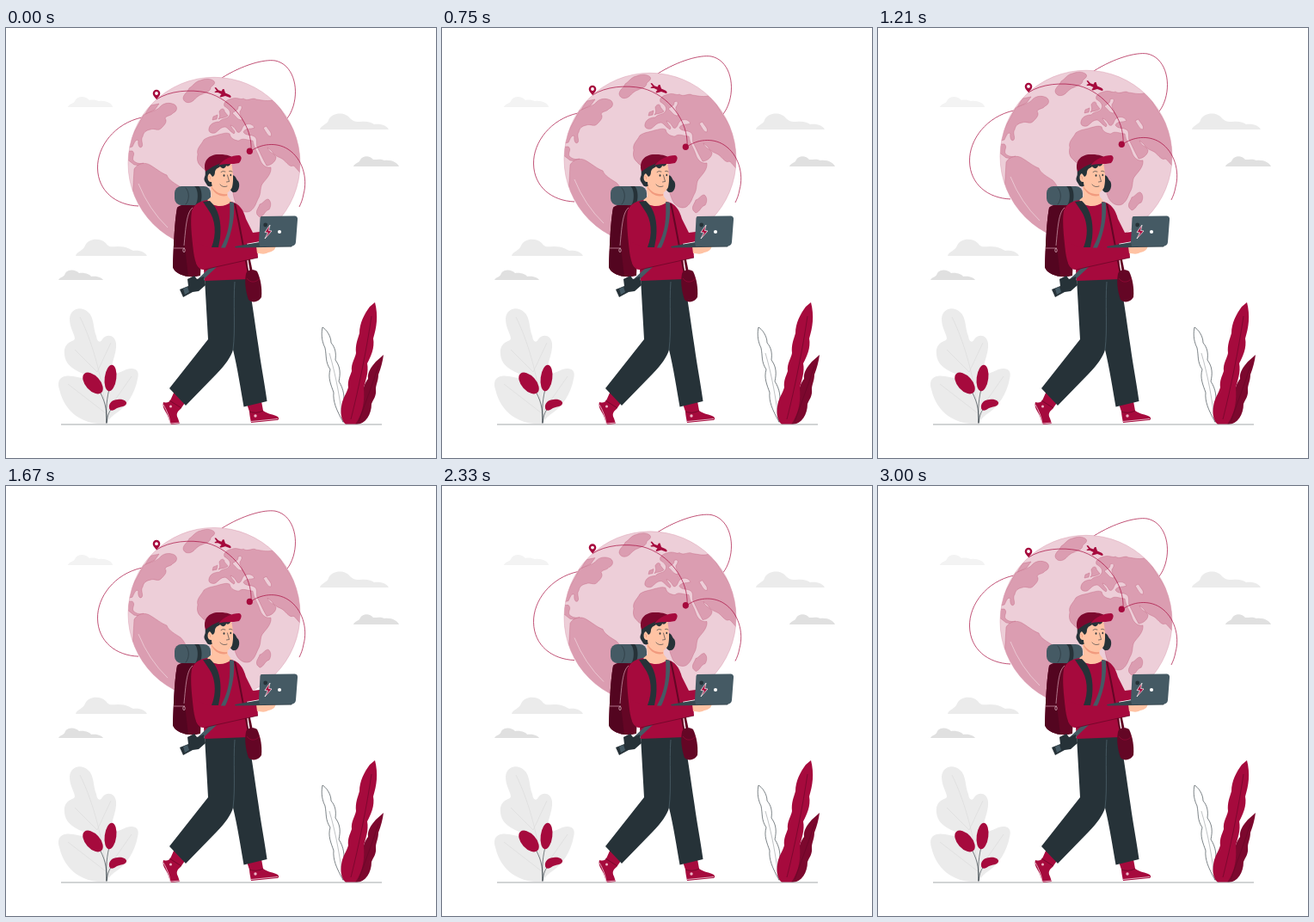
Recreate the animation shown at these times as an HTML page. Size 500 by 500 pixels, loop 3.04 s.

```html
<!DOCTYPE html>
<html lang="en">
<head>
<meta charset="utf-8">
<title>Traveller</title>
<style>
  html, body { margin: 0; width: 100%; height: 100%; overflow: hidden; background: #fff }
  svg { display: block; width: 100vw; height: 100vh }
  .red { fill: #a60a3d }
  .wine { fill: #640625 }
  .dark { fill: #263238 }
  .slate { fill: #455a64 }
  .skin { fill: #ffc3a4 }
  .pale { fill: #ebebeb }
  .grey { fill: #e0e0e0 }
  .line { fill: none; stroke: #263238; stroke-width: .6; stroke-linecap: round }
  .route { fill: none; stroke: #a60a3d; stroke-width: .7 }
  .land path { fill: #db9db1; stroke: #c0637f; stroke-width: .4 }
</style>
</head>
<body>
<svg viewBox="0 0 500 500">
  <defs><clipPath id="disc"><circle cx="242" cy="157.3" r="100"/></clipPath></defs>

  <g id="clouds">
    <path fill="#f3f3f3" d="M72 92C73 88 79 88 80 85C83 78 93 79 97 84C101 83 105 84 108 85C116 84 124 88 124 92Z"/>
    <path class="pale" d="M365 118C366 113 374 112 375 107C380 97 395 98 400 105C404 109 407 109 412 109C420 108 425 110 428 112C437 111 443 114 445 118Z"/>
    <path class="grey" d="M404 161C405 157 411 157 412 153C416 147 424 149 427 153C432 153 436 152 440 154C449 153 455 157 457 161Z"/>
    <path class="pale" d="M81 265C82 260 90 259 92 253C96 244 110 244 116 250C120 256 124 254 130 254C140 254 144 257 148 259C156 258 162 261 164 265Z"/>
    <path class="grey" d="M61 293C63 289 68 290 69 285C73 280 81 281 85 285C92 284 98 287 99 289C105 288 111 290 113 293Z"/>
  </g>

  <g id="globe">
    <path class="route" d="M251 58C275 43 300 36 313 38C333 42 341 68 334 91C332 97 330 101 327 105M158 104C126 111 106 138 106.500 163C107 190 128 206 154 207"/>
    <circle cx="242" cy="157.3" r="100" fill="#edced8" stroke="#db9db1" stroke-width=".5"/>
    <g class="land" clip-path="url(#disc)">
      <path d="M160 101C167 97 173 97 178 93C182 87 190 86 196 89C200 92 199 97 194 99C191 103 187 101 185 105C188 109 184 113 181 116C177 121 173 116 168 118C163 119 160 121 159 126C156 130 160 135 158 138C155 141 153 135 154 131C151 128 149 134 147 138L139 140Z"/>
      <path d="M168 90L178 88L173 95L162 100Z"/>
      <path d="M138 143L147 143C151 147 146 150 148 154C152 158 156 158 160 157L158 160L149 159L140 152Z"/>
      <path d="M149 164C153 157 162 156 167 159C174 163 181 169 187 171C189 177 197 181 203 185C211 193 215 206 205 222L198 250L160 235L147 200Z"/>
      <path d="M206 82C206 77 211 75 213 70C218 67 220 62 226 61C231 59 238 58 242 62C244 65 240 67 238 69C238 74 232 75 228 77C222 79 220 83 217 85C213 88 207 87 206 82Z"/>
      <path d="M248 97C250 93 254 93 254 97L258 102C255 105 250 104 247 106C250 102 248 100 248 97ZM241 103L246 101L245 106L240 107Z"/>
      <path d="M236 117C237 111 243 109 248 109C251 105 256 106 259 103C263 98 259 94 254 91C252 86 258 83 263 82C269 80 273 84 276 82C281 86 287 80 291 83C299 84 305 86 312 83L342 130L345 170C341 169 338 162 334 160C329 163 325 153 319 151C314 149 311 147 309 143L304 139C306 145 312 146 314 150C314 156 307 160 303 160C299 153 296 146 293 140C290 137 293 131 290 127C285 123 279 126 276 121C278 116 284 118 289 116C286 110 279 111 276 114C274 117 273 123 269 121C266 116 264 114 261 113C263 118 268 120 265 123C260 120 258 116 255 115C249 115 247 120 243 122C239 123 235 121 236 117Z"/>
      <path d="M223 147C221 140 227 136 230 130C235 126 242 126 247 124C252 123 256 121 260 123C261 129 267 131 271 131C275 127 282 131 287 131C288 139 293 145 295 152C297 158 301 163 308 162C309 169 303 175 299 180C295 184 297 191 294 197C291 202 290 209 284 213C278 216 270 212 267 203C263 194 264 183 260 178C255 172 257 164 249 164C241 168 232 168 227 161C222 157 222 152 223 147Z"/>
      <path d="M292 217C290 212 294 209 295 205C299 204 301 199 305 199C309 202 308 208 306 211C301 212 300 219 295 220Z"/>
      <path style="fill:#edced8" d="M263 99C267 102 269 107 274 107C276 104 271 101 272 97C276 92 274 89 270 91C270 96 267 96 263 99ZM299 116C302 120 304 126 308 126C310 121 304 118 303 114Z"/>
    </g>
    <path d="M154 181Q166 211 188 232" fill="none" stroke="#f5e2e8" stroke-width=".6"/>
    <path class="route" d="M175 83C190 73 214 71 233 75C264 83 287 114 285 143C296 135 314 132 328 141C345 152 351 175 346 193C345 199 343 204 341 208"/>
    <ellipse class="red" cx="283.3" cy="143.3" rx="3.6" ry="3.8"/>
    <path class="red" fill-rule="evenodd" d="M175 83C172 79.500 170.700 78 170.700 76A4.300 4.300 0 0 1 179.300 76C179.300 78 178 79.500 175 83ZM175 74.100A1.900 1.900 0 0 0 175 77.900A1.900 1.900 0 0 0 175 74.100Z"/>
    <path class="red" d="M242.500 69.500L244 69L247 72.200L250.500 73.500L252 71L253.500 71L255 75.500L259.500 77.500C262 79 262.500 80.500 260.500 81L255 79L249.500 80.500L248.500 79.500L250.500 77L246.500 75L243 75L242.500 74L245 73Z"/>
  </g>

  <g id="plants">
    <path class="pale" d="M117 460C100 462 70 455 62 420C58 406 68 403 78 405C88 407 93 409 96 405C88 400 70 397 68 380C67 370 71 366 79 363C83 360 74 351 74 338C75 326 87 323 95 330C103 336 101 350 105 358C106 366 110 366 112 362C117 355 127 357 128 367C129 380 121 390 123 402C128 403 133 400 140 397C150 394 156 398 153 408C150 425 140 440 128 448C122 452 118 457 117 460Z"/>
    <path fill="none" stroke="#dcdcdc" stroke-width=".7" d="M117 460C115 420 103 370 86 336M80 374L106 400L122 366M72 414L116 448L146 405M113 420L98 407"/>
    <path class="line" d="M117 459C118 443 114 431 108 421M117 459C116 443 117 430 121 416M117 459C118 450 120 444 126 440"/>
    <ellipse class="red" cx="101" cy="413" rx="8.500" ry="14.800" transform="rotate(-42 101 413)"/>
    <ellipse class="red" cx="121.500" cy="407" rx="6.800" ry="15.300" transform="rotate(7 121.500 407)"/>
    <path class="red" d="M120 442C119 436 124 432 130 432C136 431 141 434 140 437C138 441 133 440 129 442C125 445 121 446 120 442Z"/>
    <path class="line" d="M392 458C384 444 380 434 381 424C378 415 374 407 377 397C371 388 373 382 371 372C366 362 367 353 368 348C372 350 378 358 378 366C383 372 384 378 383 386C389 394 389 402 387 411C393 420 394 430 392 438C393 445 393 452 392 458"/>
    <path stroke="#263238" stroke-width=".3" fill="none" d="M391 455C389 435 384 405 376 378"/>
    <path fill="#7c082e" d="M439 380C438 388 436 395 433 403C433 410 430 415 430 420C431 428 427 432 425 437C425 450 418 460 408 461L403 461C406 445 412 435 416 428C414 418 418 412 421 408C420 400 425 394 430 388Z"/>
    <path class="red" d="M429 319C433 335 431 348 427 361C429 372 424 382 420 390C422 400 418 410 416 418C417 432 416 447 406 461L395 461C389 455 389 447 390 440C391 431 396 425 398 418C397 410 400 405 402 399C401 390 406 384 407 378C406 368 409 362 411 355C411 343 417 332 423 324Z"/>
    <path fill="none" stroke="#640625" stroke-width=".6" d="M425 335C420 370 410 420 401 455M433 393C426 415 417 438 410 458"/>
  </g>
  <path d="M64 461H437" stroke="#a4a8aa" stroke-width="1"/>

  <g id="shoes">
    <path class="red" d="M196 422L210 433L203 443C198 447 198 450 200 454L202 460L192 461C190 459 190 455 188 451C186 446 181 441 183 435C187 436 190 436 192 431Z"/>
    <path class="red" d="M280 437L297 434L299 445C304 449 311 449 316 452C318 454 317 456 315 456L285 459C284 454 283 449 283 446Z"/>
    <path d="M183 438C187 445 190 452 191 460L202 459M285 457.500L316 454.500" fill="none" stroke="#f2d5de" stroke-width=".8"/>
    <path d="M190 433L204 442M283 446Q291 449 299 445" fill="none" stroke="#640625" stroke-width=".7"/>
    <circle cx="290" cy="451" r="1.700" fill="#edb5c6"/><circle cx="191.500" cy="440" r="1.500" fill="#edb5c6"/>
  </g>

  <g id="pack">
    <path class="wine" d="M199 209C203 204 218 204 232 207L228 250L226 288C212 292 196 286 194 278C195 250 196 225 199 209Z"/>
    <path fill="#530520" d="M199 209C203 205 210 205 217 207C210 214 209 232 208 255L212 289C203 288 195 283 194 278C195 250 196 225 199 209Z"/>
    <path fill="none" stroke="#d9a5b6" stroke-width=".7" d="M217 209C210 214 209 232 207 253M194.500 256H208"/>
    <ellipse cx="207" cy="258.500" rx="1.200" ry="2.200" fill="none" stroke="#e5c0cc" stroke-width=".7"/>
    <rect class="slate" x="196" y="184" width="42" height="22" rx="8"/>
    <path class="line" d="M209 186C214 191 213 201 209 205"/>
    <path d="M219 184C224 187 224 202 220 206H225C229 200 228 187 224 184Z" class="dark"/>
  </g>

  <path class="dark" d="M231 291L281 290C285 310 289 340 293.500 370C297 395 301 415 303.500 434L276.500 440.500C273 420 269 395 264 374C262 382 254 393 245 402L209 439L190 419L235 362Z"/>
  <path d="M266 295C264 320 267 350 264 374" fill="none" stroke="#526871" stroke-width=".7"/>

  <g id="body">
    <path class="skin" d="M237 178L257 185L258 196L264 204L256 212L240 209L233 201L239 196Z"/>
    <path class="wine" d="M274 225L280 250L287 284L284 285Z"/>
    <path class="red" d="M234 200C240 208 253 210 262 202C271 204 276 211 279 222L287 238L295 237L296 248L279 251L282 292L231 294L230 281C223 281 220 274 218 260C216 242 214 225 216 213C219 203 228 201 234 200Z"/>
    <path class="dark" d="M229 202L237 201C247 210 251 225 249 244L247 255H239C245 240 244 223 235 211Z"/>
    <path class="slate" d="M260 202L265 203C266 220 263 235 257 251L248 271L242 272L253 249C260 235 261 218 260 202Z"/>
    <path fill="none" stroke="#640625" stroke-width="2" d="M266 204C271 225 276 255 282 287"/>
    <path class="slate" d="M241 275L247 276L230 292L224 291Z"/>
    <path class="red" d="M221 249L235 255L268 256L292 253L293 267L239 279C230 282 223 280 221 273Z"/>
    <path fill="none" stroke="#640625" stroke-width=".7" d="M231 281L239 279L293 267"/>
    <path class="wine" d="M279 286C280 281 288 280 292 283C296 291 298 303 297 313C294 319 286 320 282 316C279 307 277 296 279 286Z"/>
    <path fill="none" stroke="#a60a3d" stroke-width=".6" d="M280 291C284 297 291 296 295 291"/>
    <path class="dark" d="M211 292L219 288L222 292L230 289L232 299L224 306L217 307L206 313L202 304L212 300Z"/>
    <path class="slate" d="M206 303L211 301L213 307L208 310Z"/>
  </g>

  <g id="head">
    <path class="dark" d="M234 162C230 166 233 170 231 173C229 178 233 180 234 183C237 186 241 184 243 180L247 164ZM262 171C268 171 267 176 270 178C273 183 270 191 266 191C262 192 260 187 260 183Z"/>
    <path class="skin" d="M242 163L262 157C264 166 265 177 263 185C260 192 252 195 246 191C241 188 239 183 239 179C234 180 233 171 237 169L240 171Z"/>
    <path fill="#f19a7e" d="M239 184C243 191 250 194 257 193L257 195C249 197 242 192 239 186Z"/>
    <path class="dark" d="M235 166C241 156 255 154 262 156C261 159 259 162 256 160C255 164 251 164 249 161C247 163 244 163 243 167Q243 172 240 173Z"/>
    <path fill="#7c082e" d="M232 167C228 154 237 146 249 147C257 147 263 149 266 153C255 155 243 158 232 167Z"/>
    <path class="red" d="M247 160C253 152 263 148 271 148C275 149 274 154 271 157C263 159 254 157 247 160Z"/>
    <ellipse class="dark" cx="253.500" cy="171.500" rx=".9" ry="1.200"/><ellipse class="dark" cx="261.300" cy="171" rx=".8" ry="1.200"/>
    <path class="line" d="M250 167.500Q252 165.500 255 167M259.500 166.500Q261 165.500 263 167M257.500 171L259.500 178.500L256.500 179M249 182Q252 186 257 184"/>
    <path d="M235.500 172Q238 172 237.500 176" fill="none" stroke="#e7886e" stroke-width=".6"/>
  </g>

  <g id="laptop">
    <path class="skin" d="M291 254L313 252C315 256 311 260 305 261C300 264 296 262 292 262Z"/>
    <path fill="#37474f" d="M266 254L295 249L333 253L332 254.500L267 255.500Z"/>
    <path class="slate" d="M297 219L336 218.500Q339.500 219 339 223L337 249Q336.500 253.300 332 253.500L295 254L294 249L295.500 221Q296 219 297 219Z"/>
    <path class="red" stroke="#fff" stroke-width=".7" d="M307 229L301 237.500L304.500 238L301 245L309 236L305.500 235.500Z"/>
    <circle cx="301.700" cy="229" r="2.400" class="dark"/>
    <circle cx="318" cy="237" r="2.100" fill="#fff"/>
  </g>
</svg>
<script>
  const LOOP = 3040, RISE = 1500, LIFT = 10;
  const globe = document.getElementById("globe");

  // Steady climb, steady descent, then a short rest.
  function draw(now) {
    const t = now % LOOP;
    const y = -LIFT * Math.max(0, 1 - Math.abs(t / RISE - 1));
    globe.setAttribute("transform", `translate(0 ${y.toFixed(2)})`);
    requestAnimationFrame(draw);
  }
  draw(0);
</script>
</body>
</html>
```
